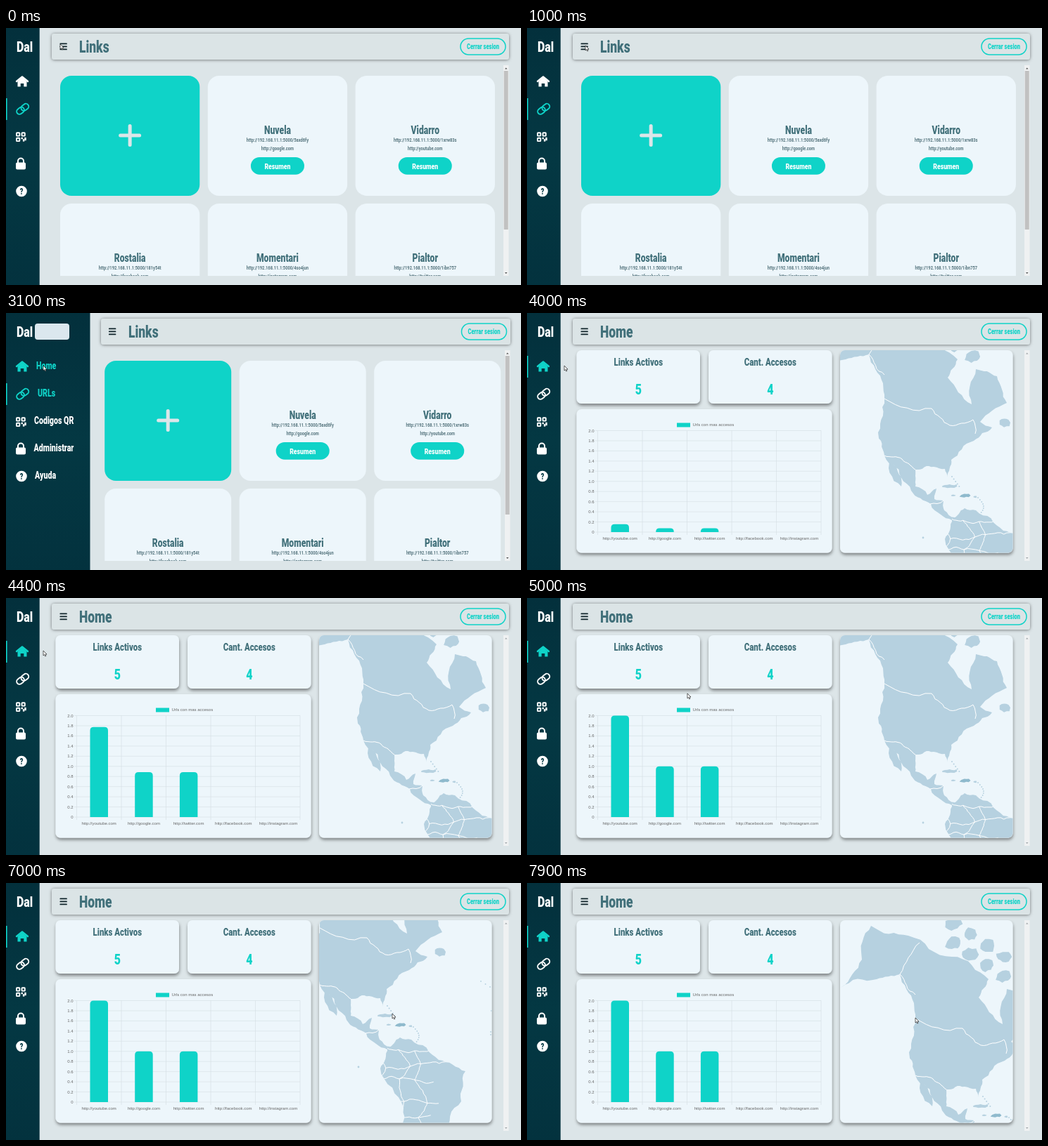
Recreate the animation shown at these times as an HTML page. Size 732 by 366 pixels, loop 8 s.

```html
<!DOCTYPE html>
<html lang="es">
<head>
<meta charset="utf-8">
<title>Links</title>
<style>
html, body { margin: 0; width: 100%; height: 100%; overflow: hidden; background: #dce5e8; }
svg { display: block; width: 100%; height: 100%; }
.head { font-family: Roboto, sans-serif; font-weight: 800; }
.url { font-family: Roboto, sans-serif; font-weight: 600; }
.axis { font: 6px "Liberation Sans", sans-serif; fill: #666; }
</style>
</head>
<body>
<svg id="stage" viewBox="0 0 732 366" preserveAspectRatio="none">
  <defs>
    <linearGradient id="dark" x2="0" y2="1">
      <stop stop-color="#03303c"/><stop offset=".5" stop-color="#043843"/><stop offset="1" stop-color="#03323e"/>
    </linearGradient>
    <filter id="soft" x="-10%" y="-30%" width="120%" height="160%">
      <feDropShadow dx="0" dy="0.5" stdDeviation="2.2" flood-opacity=".5"/>
    </filter>
    <filter id="lift" x="-10%" y="-10%" width="120%" height="130%">
      <feDropShadow dx="0.5" dy="3" stdDeviation="2.2" flood-opacity=".42"/>
    </filter>
    <clipPath id="list"><rect x="48" y="53" width="684" height="300"/></clipPath>
    <clipPath id="mapBox"><rect x="445" y="53" width="245.5" height="288.5" rx="7"/></clipPath>
  </defs>
  <g id="scene"></g>
</svg>
<script>
const LOOP = 8000, STEP = 100;
const TEAL = '#0fd3c8', INK = '#41707a', PALE = '#edf6fb', LAND = '#b6d1e0', DARK = '#10242b';
const CONDENSE = 0.76;

const lerp = (a, b, p) => a + (b - a) * p;
const clamp = v => Math.max(0, Math.min(1, v));
const smooth = v => v * v * (3 - 2 * v);
const repeat = (n, f) => Array.from({ length: n }, (_, i) => f(i)).join('');

const rect = (x, y, w, h, r, fill, more = '') =>
  `<rect x="${x}" y="${y}" width="${w}" height="${h}" rx="${r}" fill="${fill}" ${more}/>`;
const line = (d, color, w, more = '') =>
  `<path d="${d}" fill="none" stroke="${color}" stroke-width="${w}" ${more}/>`;
const shape = (d, fill) => `<path d="${d}" fill="${fill}"/>`;
const disc = (x, y, r, fill) => `<circle cx="${x}" cy="${y}" r="${r}" fill="${fill}"/>`;
const head = (s, x, y, size, fill, anchor = 'start', kind = 'head') =>
  `<text class="${kind}" transform="translate(${x} ${y}) scale(${CONDENSE} 1)" font-size="${size}" fill="${fill}" text-anchor="${anchor}">${s}</text>`;
const axis = (s, x, y, anchor) => `<text class="axis" x="${x}" y="${y}" text-anchor="${anchor}">${s}</text>`;

// CSS "ease": cubic-bezier(.25, .1, .25, 1)
function ease(x) {
  if (x <= 0 || x >= 1) return clamp(x);
  let lo = 0, hi = 1, u = 0.5;
  const bez = (a, b) => 3 * a * u * (1 - u) ** 2 + 3 * b * u * u * (1 - u) + u ** 3;
  for (let i = 0; i < 20; i++) {
    u = (lo + hi) / 2;
    if (bez(0.25, 0.25) < x) lo = u; else hi = u;
  }
  return bez(0.1, 1);
}

// Pointer moves; those that drag also carry the map
const MOVES = [
  { from: 600, to: 1000, at: [83, 25] },
  { from: 2000, to: 2400, at: [53, 75] },
  { from: 4800, to: 5300, at: [550, 248] },
  { from: 5300, to: 5800, at: [393, 104], drag: true },
  { from: 5800, to: 6200, at: [454, 100] },
  { from: 6500, to: 7000, at: [549, 186], drag: true },
  { from: 7000, to: 7400, at: [446, 63] },
  { from: 7400, to: 7900, at: [552, 192], drag: true }
];

function motion(t) {
  let x = 77, y = 23, panX = 0, panY = 0;
  for (const { from, to, at, drag } of MOVES) {
    const p = smooth(clamp((t - from) / (to - from)));
    const dx = (at[0] - x) * p, dy = (at[1] - y) * p;
    x += dx; y += dy;
    if (drag) { panX += dx; panY += dy; }
    if (p < 1) break;
  }
  return { x, y, panX, panY };
}

const ICONS = [
  c => line('M15 76 L23 69.500 L31 76', c, 2.4, 'stroke-linejoin="round" stroke-linecap="round"') +
    shape('M16.500 76 L23 70.500 L29.500 76 V83.500 H25.300 V79 H20.700 V83.500 H16.500 Z', c),
  c => `<g transform="rotate(-38 23.500 115.500)">` + [14, 22].map(x =>
    rect(x, 111.5, 11.5, 8, 4, 'none', `stroke="${c}" stroke-width="1.900"`)).join('') + '</g>',
  c => repeat(3, i => rect(15 + 7.5 * (i % 2), 149.3 + 7.5 * (i >> 1), 4.3, 4.3, 0.6, 'none', `stroke="${c}" stroke-width="1.900"`)) +
    repeat(3, i => rect(21.5 + 2.4 * i, 155.8 + 2.4 * (i % 2), 2.4, 2.4 + i, 0, c)),
  c => rect(14, 191.5, 14, 10, 2, c) + line('M17 192 V189.500 A4 4 0 0 1 25 189.500 V192', c, 2),
  c => disc(22, 232.5, 7.8, c) + head('?', 22, 236.5, 12, '#043843', 'middle')
];
const MENU = [['Home', 43], ['URLs', 45], ['Codigos QR', 40], ['Administrar', 39.5], ['Ayuda', 41]];

function sidebar(w, active, hover) {
  const items = MENU.map(([label, x], i) => {
    const c = i === active || i === hover ? TEAL : '#fff';
    return ICONS[i](c) + head(label, x, 80 + 39.1 * i, 14, c);
  }).join('');
  return `<clipPath id="side"><rect width="${w - 9}" height="366"/></clipPath>` +
    rect(0, 0, w, 366, 0, 'url(#dark)') + rect(0, 61 + 39 * active, 1.6, 31, 0, TEAL) +
    `<g clip-path="url(#side)">${head('Dal', 15, 34, 21, '#fff')}${rect(41, 15, 49, 23, 4, '#dbe7ee')}${items}</g>`;
}

function header(title, p) {
  const x = lerp(65, 135, p), right = lerp(715, 717, p), b = lerp(76.5, 146, p), c = lerp(678, 679.5, p);
  return rect(x, 8, right - x, 37, 4, '#dbe4e6', 'filter="url(#soft)"') +
    repeat(3, i => rect(b, 21.5 + 4 * i, 10.3, 1.8, 0.6, DARK)) +
    head(title, lerp(104, 174, p), 35, 23, INK) +
    rect(c - 32, 15, 64, 23, 11.5, 'none', `stroke="${TEAL}" stroke-width="1.500"`) +
    head('Cerrar sesion', c, 30.2, 10, TEAL, 'middle');
}

function scrollbar(x, thumb) {
  return rect(x, 53, 7.5, 300, 0, '#eff1f2') + (thumb ? rect(x + 0.7, 61, 6, 226, 0, '#c1c1c1') : '') +
    shape(`M${x + 2} 58.500 h3.500 l-1.750 -2z M${x + 2} 348 h3.500 l-1.750 2z`, thumb ? '#505050' : '#a0a6a9');
}

const CARDS = [
  ['Nuvela', '5axd6fy', 'google'], ['Vidarro', '1xrw83s', 'youtube'],
  ['Rostalia', '181y54t', 'facebook'], ['Momentari', '4so4jun', 'instagram'], ['Pialtor', '1ibn757', 'twitter']
];

function linksPage(p) {
  const left = lerp(77, 140.2, p), w = lerp(198.3, 180, p), gap = lerp(209.8, 191.5, p);
  const place = i => [left + gap * (i % 3), 68 + 182 * Math.floor(i / 3)];
  const [x0, y0] = place(0);
  const add = rect(x0, y0, w, 171, 16, TEAL) +
    line(`M${x0 + w / 2 - 13.5} 153 h27 m-13.500 -13.500 v27`, '#dce6e9', 5, 'stroke-linecap="round"');
  const cards = CARDS.map(([name, code, site], i) => {
    const [x, y] = place(i + 1), c = x + w / 2;
    return rect(x, y, w, 171, 16, PALE) +
      head(name, c, y + 82.5, 16, INK, 'middle') +
      head('http://192.168.11.1:5000/' + code, c, y + 94, 7.6, '#56757e', 'middle', 'url') +
      head(`http://${site}.com`, c, y + 105.5, 7.6, '#56757e', 'middle', 'url') +
      rect(c - 38, y + 116, 76, 24.7, 12.3, TEAL) +
      head('Resumen', c, y + 132.5, 11.5, '#fff', 'middle');
  }).join('');
  return `<g clip-path="url(#list)">${add}${cards}</g>` + scrollbar(lerp(707, 709, p), true);
}

const VISITS = { youtube: 2, google: 1, twitter: 1, facebook: 0, instagram: 0 };

function chart(grow) {
  const rows = repeat(11, i => {
    const y = 312 - 14.45 * i;
    return line(`M97 ${y} H418`, '#d3dde2', 0.6) + axis(i ? (i / 5).toFixed(1) : '0', 95.5, y + 2, 'end');
  });
  const columns = repeat(6, i => line(`M${100.5 + 63.5 * i} 167.500 V316`, '#d3dde2', 0.6));
  const bars = Object.entries(VISITS).map(([site, v], i) => {
    const x = 119.5 + 63.7 * i, h = v * 72.25 * grow, r = Math.min(5, h);
    const bar = `M${x} 312 v${r - h} q0 ${-r} ${r} ${-r} h${25.5 - 2 * r} q${r} 0 ${r} ${r} v${h - r}z`;
    return (h ? shape(bar, TEAL) : '') + axis(`http://${site}.com`, x + 12.7, 323, 'middle');
  }).join('');
  return rect(213, 156.5, 19, 6, 0, TEAL) + axis('Urls con mas accesos', 235.5, 161.3, 'start') + rows + columns + bars;
}

let seed = 11;
const rnd = () => (seed = (seed * 16807) % 2147483647) / 2147483647 - 0.5;

// Rough line between two points by midpoint displacement
function rough(a, b, depth) {
  const dx = b[0] - a[0], dy = b[1] - a[1];
  if (!depth || Math.hypot(dx, dy) < 6) return [b];
  const k = rnd() * 0.26, m = [(a[0] + b[0]) / 2 - dy * k, (a[1] + b[1]) / 2 + dx * k];
  return [...rough(a, m, depth - 1), ...rough(m, b, depth - 1)];
}
const pairs = text => text.split(' ').map(s => s.split(',').map(Number));
const toPath = pts => 'M' + pts.map(p => p.map(v => v.toFixed(1)).join(' ')).join('L');
const trail = pts => toPath(pts.flatMap((p, i) => i ? rough(pts[i - 1], p, 3) : [p]));
const coast = pts => trail([...pts, pts[0]]) + 'Z';
const island = (x, y, rx, ry) => coast(Array.from({ length: 7 }, (_, i) => {
  const a = i / 7 * 2 * Math.PI, k = 1 + rnd() * 0.5;
  return [x + rx * k * Math.cos(a), y + ry * k * Math.sin(a)];
}));

// Wavering brick pattern that stands for country borders
function bricks(x, y, cols, rows, size) {
  const node = (c, r) => [x + (c + r % 2 / 2) * size + 5 * Math.sin(3 * c + 5 * r), y + r * size + 5 * Math.sin(7 * c + 2 * r)];
  let d = '';
  for (let r = 0; r < rows; r++) for (let c = 0; c < cols; c++) {
    d += trail([node(c, r + 1), node(c, r), node(c + 1, r)]);
  }
  return d;
}

const NORTH = coast(pairs('402,78 453,66 486,59 506,100 508,122 499,170 508,203 532,247 520,214 546,253 574,272 ' +
  '588,287 604,295 608,291 593,281 592,267 579,265 582,250 569,259 552,247 552,223 578,219 594,222 598,234 ' +
  '603,209 635,182 661,163 644,155 682,128 668,90 638,80 632,130 598,92 612,66 560,34 498,4 445,-10 432,38'));
const SOUTH = coast(pairs('604,293 622,278 638,281 677,310 715,326 709,369 682,414 660,437 645,490 636,490 627,430 627,378 594,322'));
const AFRICA = coast(pairs('785,298 769,272 802,219 862,214 862,340 835,304'));
const EUROPE = coast(pairs('803,190 862,178 862,206 816,216'));
const ISLES = [
  island(600, 247, 14, 3), island(680, 156, 8, 6), island(606, 260, 3, 1.2), island(637, 262, 2.5, 1.4),
  ...Array.from({ length: 8 }, (_, i) => {
    const x = 562 + 24 * (i % 4);
    return island(x, 18 + 0.65 * (x - 566) - 28 * (i >> 2), 11, 9);
  })
].join('');
const HISPANIOLA = island(623, 260, 8, 3);
const BORDERS = ['508,122 575,136 601,160 634,152 637,172', '514,14 486,59 508,88', '508,203 533,208 552,223', '573,272 592,267']
  .map(s => trail(pairs(s))).join('');
const NATIONS = bricks(594, 292, 3, 8, 25), STATES = bricks(762, 232, 5, 4, 20);

const DOTS =
  repeat(8, i => disc(641 + 8 * Math.sin(i * 0.36), 263 + 3 * i, 0.9, LAND)) +
  repeat(5, i => disc(604 + 2.6 * i, 233 + 3.5 * i, 1, LAND)) +
  repeat(6, i => disc(752 + 3 * i, 240 + i % 3, 1, LAND)) +
  repeat(4, i => disc(751 + 3 * (i % 2), 270 + 2 * i, 0.9, LAND)) +
  repeat(3, i => disc(737 + 6.5 * i, 198 + 4 * i, 0.9, LAND)) +
  disc(563, 320, 1.4, LAND);

const white = (d, more) => line(d, '#fff', 1, more);
const MAP = `<clipPath id="lands"><path d="${SOUTH}${AFRICA}"/></clipPath>` +
  [NORTH, SOUTH, AFRICA, EUROPE, ISLES].map(d => shape(d, LAND)).join('') + DOTS +
  shape(HISPANIOLA, '#8fbacd') + white(BORDERS) + white(NATIONS + STATES, 'clip-path="url(#lands)"');

function homePage(t, { panX, panY }) {
  const grow = 1 - (1 - clamp((t - 3980) / 1000)) ** 4;
  const panel = (x, y, w, h) => rect(x, y, w, h, 7, PALE, 'filter="url(#lift)"');
  const count = (label, n, x) => panel(x - 87.8, 53, 175.5, 76) +
    head(label, x, 75, 15, INK, 'middle') + head(n, x, 115.5, 21, TEAL, 'middle');
  return count('Links Activos', 5, 158.3) + count('Cant. Accesos', 4, 345.8) +
    panel(70.5, 137, 363, 204.5) + chart(grow) + panel(445, 53, 245.5, 288.5) +
    `<g clip-path="url(#mapBox)"><g transform="translate(${panX} ${panY})">${MAP}</g></g>` +
    scrollbar(707, false);
}

const pointer = ({ x, y }) =>
  `<path transform="translate(${x} ${y})" d="M0 0 V7 L1.600 5.600 L2.700 8 L3.900 7.500 L2.900 5.100 H5Z" fill="#fff" stroke="#222" stroke-width=".7"/>`;

function draw(t) {
  const home = t >= 4000, m = motion(t);
  const p = home ? 0 : ease((t - 1388) / 500);
  const hover = !home && t >= 2300 ? 0 : -1;
  return rect(0, 0, 732, 366, 0, '#dce5e8') +
    (home ? homePage(t, m) : linksPage(p)) +
    header(home ? 'Home' : 'Links', p) +
    sidebar(lerp(47.7, 119.5, p), home ? 0 : 1, hover) +
    pointer(m);
}

const scene = document.getElementById('scene');
const start = performance.now();
let shown = -1;
function tick() {
  const t = Math.floor(((performance.now() - start) % LOOP) / STEP) * STEP;
  if (t !== shown) scene.innerHTML = draw(shown = t);
  requestAnimationFrame(tick);
}
tick();
</script>
</body>
</html>
```
